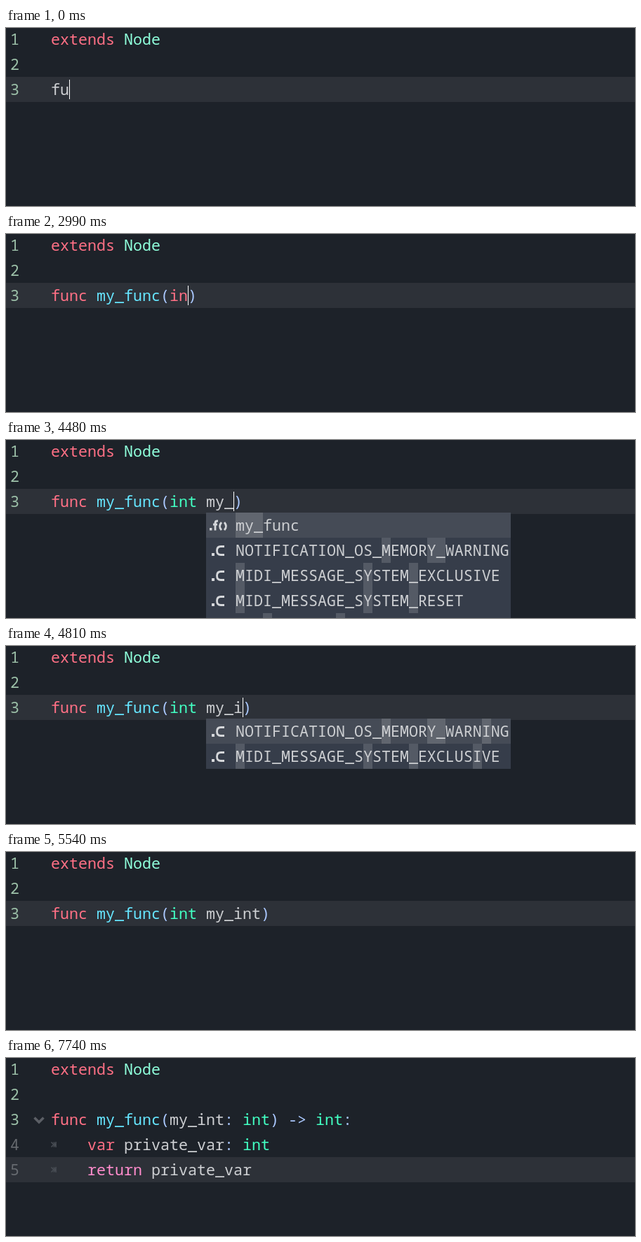
An HTML page that plays this animation: 896x255 px, repeating every 8 s.

```html
<!DOCTYPE html>
<html lang="en">
<head>
<meta charset="utf-8">
<title>Typing a function</title>
<style>
  html, body { margin: 0; width: 100%; height: 100%; overflow: hidden; background: #1d2229; }
  svg { display: block; width: 896px; height: 255px; }
  text {
    font: 21.667px "Noto Sans Mono", "DejaVu Sans Mono", monospace;
    font-variant-ligatures: none;
    white-space: pre;
    fill: #cdcfd2;
  }
  .keyword { fill: #ff7085; }
  .flow { fill: #ff8ccc; }
  .type { fill: #42ffc2; }
  .engine { fill: #8fffdb; }
  .func { fill: #66e6ff; }
  .symbol { fill: #abc9ff; }
  .safe { fill: #9cc0a8; }
  .number { fill: #676b70; }
  .row { fill: #2d3138; }
  .popup { fill: #363d4a; }
  .selected { fill: #454b56; }
  .match { fill: #fff; fill-opacity: .15; }
  .dot { fill: #d5d7da; }
  .icon { fill: none; stroke: #d5d7da; stroke-width: 2.8; }
  .fold { fill: none; stroke: #5b5f65; stroke-width: 3.6; }
  .tab { fill: none; stroke: #484d54; stroke-width: 1.6; }
  .caret { fill: #fff; }
</style>
</head>
<body>
<svg id="editor" viewBox="0 0 896 255"></svg>
<script>
const LOOP = 8000, CELL = 13, LINE = 36, LEFT = 64;
const editor = document.getElementById("editor");

// Third line over time; "|" marks a visible caret.
const typing = [
  [0, "fu|"], [70, "fun|"], [220, "func|"],
  [530, "func |"], [750, "func m|"], [980, "func my|"], [1200, "func my_|"],
  [1480, "func my_f|"], [1530, "func my_fu|"], [1680, "func my_fun|"], [1810, "func my_func|"],
  [2140, "func my_func(|)"], [2670, "func my_func()"], [2860, "func my_func(i|)"],
  [2990, "func my_func(in|)"], [3140, "func my_func(int|)"], [3270, "func my_func(int |)"],
  [3730, "func my_func(int )"], [3980, "func my_func(int m|)"], [4150, "func my_func(int my|)"],
  [4480, "func my_func(int my_|)"], [4810, "func my_func(int my_i|)"],
  [4940, "func my_func(int my_in|)"], [5060, "func my_func(int my_int|)"],
  [5540, "func my_func(int my_int)"], [5940, "func my_func(int my_int)|"],
  [6470, "func my_func(int my_int) |"], [6930, "func my_func(int my_int) -|"],
  [7100, "func my_func(int my_int) ->|"], [7280, "func my_func(int my_int) -> |"],
  [7740, "func my_func(my_int: int) -> int:"]
];

const warning = "NOTIFICATION_OS_MEMORY_WARNING";
const exclusive = "MIDI_MESSAGE_SYSTEM_EXCLUSIVE";

// Each entry: label and the columns of its matched letters.
const completions = {
  4480: [
    ["my_func", [0, 1, 2]],
    [warning, [16, 21, 22]],
    [exclusive, [0, 14, 19]],
    ["MIDI_MESSAGE_SYSTEM_RESET", [0, 14, 19]],
    ["", [3, 11]]
  ],
  4810: [[warning, [16, 21, 22, 27]], [exclusive, [0, 14, 19, 26]]],
  4940: [[warning, [16, 21, 22, 27, 28]]]
};

const words = {
  extends: "keyword", func: "keyword", var: "keyword", in: "keyword",
  return: "flow", int: "type", Node: "engine"
};

const escapeText = s => s.replace(/</g, "&lt;").replace(/>/g, "&gt;");
const rect = (cls, x, y, w, h) =>
  `<rect class="${cls}" x="${x}" y="${y}" width="${w}" height="${h}"/>`;
const path = (cls, d) => `<path class="${cls}" d="${d}"/>`;
const label = (cls, x, y, s) =>
  `<text class="${cls}" x="${x}" y="${y}">${escapeText(s)}</text>`;
const baseline = n => n * LINE - 12;
const columnX = col => LEFT + col * CELL;

function tokenClass(token, rest) {
  if (!/^\w/.test(token)) return "symbol";
  return words[token] || (rest.startsWith("(") ? "func" : "");
}

function codeLine(n, code, indent = 0) {
  let out = "";
  for (const m of code.matchAll(/\w+|[^\w\s]+/g)) {
    const rest = code.slice(m.index + m[0].length);
    out += label(tokenClass(m[0], rest), columnX(m.index + indent), baseline(n), m[0]);
  }
  return out;
}

const lineNumber = (n, cls = "safe") => label(cls, 6, baseline(n), String(n));

const tabMark = n => {
  const y = n * LINE - 20;
  return path("tab", `M64.5 ${y - 3.5}l3.5 3.5l-3.5 3.5M68 ${y - 3.5}l2 3.5l-2 3.5M71 ${y - 4}v8`);
};

function popupIcon(isFunction, y) {
  const shape = isFunction
    ? rect("dot", 290, 4, 3.5, 3.5) +
      path("icon", "M302-6h-1q-3 0-3 3V7.5M295-1h6M307-4q-5 5.5 0 11M311-4q5 5.5 0 11")
    : rect("dot", 293, 4, 4, 4) +
      path("icon", "M311-5.5H306Q300.5-5.5 300.5 .5T306 6.5H311");
  return `<g transform="translate(0 ${y})">${shape}</g>`;
}

function popup(items) {
  let out = rect("popup", 285, 104, 434, items.length * LINE) +
    rect("selected", 285, 104, 434, LINE);
  items.forEach(([name, matches], i) => {
    const top = 104 + i * LINE;
    for (const col of matches) out += rect("match", 327 + col * CELL, top, CELL, LINE);
    if (name) out += popupIcon(name === "my_func", top + 18) + label("", 327, top + 26, name);
  });
  return out;
}

function underlineBraces(code, caret) {
  if (code[caret - 1] !== ")") return "";
  return [code.indexOf("("), caret - 1]
    .map(col => rect("symbol", columnX(col), 99, CELL, 1)).join("");
}

function draw([time, marked]) {
  const done = time === 7740;
  const caret = marked.indexOf("|");
  const code = marked.replace("|", "");
  let out = rect("row", 0, done ? 142 : 70, 896, LINE);
  out += lineNumber(1) + lineNumber(2) + lineNumber(3);
  out += codeLine(1, "extends Node") + codeLine(3, code);
  if (done) {
    out += lineNumber(4, "number") + lineNumber(5, "number");
    out += path("fold", "M40.5 85.5L47 92L53.5 85.5") + tabMark(4) + tabMark(5);
    out += codeLine(4, "var private_var: int", 4) + codeLine(5, "return private_var", 4);
  }
  if (caret >= 0) {
    out += underlineBraces(code, caret) + rect("caret", columnX(caret), 74, 1, 28);
  }
  if (completions[time]) out += popup(completions[time]);
  editor.innerHTML = out;
}

const start = performance.now();
let shown = null;

function tick() {
  const time = (performance.now() - start) % LOOP;
  const step = typing.findLast(([at]) => at <= time);
  if (step !== shown) draw(shown = step);
  requestAnimationFrame(tick);
}
tick();
</script>
</body>
</html>
```
